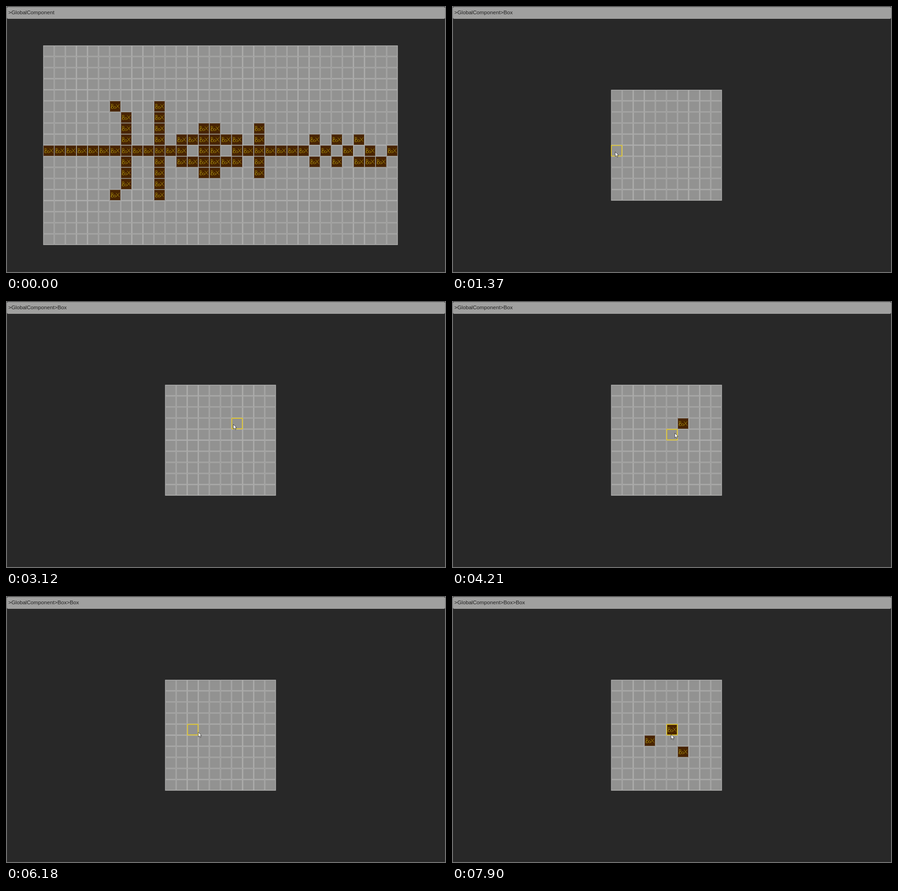
These frames come from a looping animation (961x583 px, 8000 ms). An HTML page with a canvas:

```html
<!DOCTYPE html>
<html lang="en">
<head>
<meta charset="utf-8">
<title>Component editor</title>
<style>
html, body { margin: 0; width: 100%; height: 100%; overflow: hidden; background: #282828; }
canvas { display: block; }
</style>
</head>
<body>
<canvas id="stage" width="961" height="583"></canvas>
<script>
const ctx = document.getElementById('stage').getContext('2d');
const LOOP = 8000, TICK = 108.85, TICK_OFFSET = 55;
const LEFT = 81.2, TOP = 86.1, CELL = 24.2;
const POINTER_START = 100, HOVER_START = 1260;

const between = (value, low, high) => value >= low && value <= high;

// The outer component is a shape that is almost mirrored about row 9.
function outerBox(col, row) {
  const distance = Math.abs(row - 9), odd = col % 2 === 1;
  if (distance === 0) return col > 23 ? odd : col !== 13 && col !== 16;
  if (distance === 1 && between(col, 12, 17)) return true;
  if (distance === 1 && between(col, 24, 28)) return !odd;
  if (row === 10 && between(col, 29, 30)) return true;
  if (col === 6) return distance === 4;
  if (col === 7) return distance <= 3;
  if (col === 10) return distance <= 4;
  return distance <= 2 && (between(col, 14, 15) || col === 19);
}

// Boxes appear once the pointer leaves the cell it has clicked.
const placed = (...boxes) => (col, row, time) =>
  boxes.some(b => b.col === col && b.row === row && time >= b.at);

const inner = { col: 11, row: 4, cols: 10, rows: 10 };
const scenes = [
  { start: 0, path: '>GlobalComponent', grid: { col: 0, row: 0, cols: 32, rows: 18 }, hasBox: outerBox },
  { start: 1370, path: '>GlobalComponent>Box', grid: inner,
    hasBox: placed({ col: 17, row: 7, at: 4210 }, { col: 15, row: 9, at: 4760 }, { col: 13, row: 8, at: 5740 }) },
  { start: 6065, path: '>GlobalComponent>Box>Box', grid: inner,
    hasBox: placed({ col: 14, row: 9, at: 6820 }, { col: 16, row: 8, at: 7260 }, { col: 17, row: 10, at: 7690 }) }
];

// Each move glides from the previous position, then the pointer rests.
const pointerOrigin = { x: 739, y: 503 };
const moves = [
  { from: 100, to: 730, x: 358, y: 307 },
  { from: 730, to: 840, x: 378, y: 314 },
  { from: 840, to: 1030, x: 356, y: 318 },
  { from: 1590, to: 1920, x: 419.5, y: 267 },
  { from: 2165, to: 2450, x: 506, y: 267 },
  { from: 2900, to: 3100, x: 496, y: 269 },
  { from: 4080, to: 4420, x: 466, y: 327 },
  { from: 4650, to: 4970, x: 390, y: 268 },
  { from: 5100, to: 5400, x: 434, y: 325 },
  { from: 5400, to: 6150, x: 419.5, y: 297 },
  { from: 6280, to: 6590, x: 433, y: 324 },
  { from: 6600, to: 7030, x: 490, y: 295 },
  { from: 7040, to: 7460, x: 505, y: 351 },
  { from: 7470, to: 7890, x: 478, y: 302 }
];

const boxGlyph = new Path2D(
  'M-8-4.5V4.5M-9-4.5C-3.5-6-3-1.5-7.5-.5C-2-1.5-2 4.5-6 4.8C-10 5-10 1-6.5.5' +
  'M-1.5 0C-4.5 1-3 5-.5 4.5C2.5 3.5 1.5-1-1.5 0M2-4.5L9.5 4.5M9.5-5L1.5 4.5');
const arrow = new Path2D('M0 0V10.2L2.4 8L4.1 11.6L5.8 10.8L4.2 7.4H7.4Z');

function fillRect(color, x, y, w, h) {
  ctx.fillStyle = color;
  ctx.fillRect(x, y, w, h);
}

function drawAt(x, y, draw) {
  ctx.save();
  ctx.translate(x, y);
  draw();
  ctx.restore();
}

function stroke(color, width, path) {
  ctx.strokeStyle = color;
  ctx.lineWidth = width;
  ctx.stroke(path);
}

function pointerAt(time) {
  const sampled = Math.floor((time - TICK_OFFSET) / TICK) * TICK + TICK_OFFSET;
  let { x, y } = pointerOrigin;
  for (const move of moves) {
    const progress = Math.min(1, Math.max(0, (sampled - move.from) / (move.to - move.from)));
    x += (move.x - x) * progress;
    y += (move.y - y) * progress;
  }
  return { x, y };
}

function drawWindow(path) {
  fillRect('#777', 0, 0, 961, 583);
  fillRect('#282828', 2, 1, 957, 580);
  ctx.beginPath();
  ctx.roundRect(2, 2, 957, 26, 3);
  ctx.fillStyle = '#a0a09f';
  ctx.fill();
  ctx.fillStyle = '#202020';
  ctx.font = '11.65px "Liberation Sans", Arial, sans-serif';
  ctx.fillText(path, 5, 18);
}

function drawBox() {
  fillRect('#482400', .8, .8, CELL - 1.6, CELL - 1.6);
  drawAt(CELL / 2, CELL / 2, () => stroke('#a88d10', .9, boxGlyph));
}

function drawGrid({ grid, hasBox }, time) {
  for (let row = grid.row; row < grid.row + grid.rows; row++)
    for (let col = grid.col; col < grid.col + grid.cols; col++)
      drawAt(LEFT + col * CELL, TOP + row * CELL, () => {
        fillRect('#adadac', 0, 0, CELL + .2, CELL + .2);
        if (hasBox(col, row, time)) drawBox();
        else fillRect('#929291', 1.4, 1.4, CELL - 2.8, CELL - 2.8);
      });
}

function drawHover({ x, y }, covered) {
  const snap = (value, origin) => origin + Math.floor((value - origin) / CELL) * CELL;
  drawAt(snap(x, LEFT), snap(y, TOP), () => {
    if (covered) return fillRect('#c79a25', 0, -.4, CELL, 1);
    const frame = new Path2D();
    frame.rect(.7, .6, CELL - 1.2, CELL - 1.2);
    stroke('#e6ca22', 1.7, frame);
  });
}

function drawPointer({ x, y }) {
  drawAt(x + .5, y + .5, () => {
    ctx.fillStyle = '#fff';
    ctx.fill(arrow);
    stroke('#222', .8, arrow);
  });
}

function render() {
  const time = performance.now() % LOOP;
  const scene = scenes.findLast(s => s.start <= time);
  const pointer = pointerAt(time);
  drawWindow(scene.path);
  drawGrid(scene, time);
  if (time >= HOVER_START) drawHover(pointer, scene === scenes[0]);
  if (time >= POINTER_START) drawPointer(pointer);
  requestAnimationFrame(render);
}
render();
</script>
</body>
</html>
```
